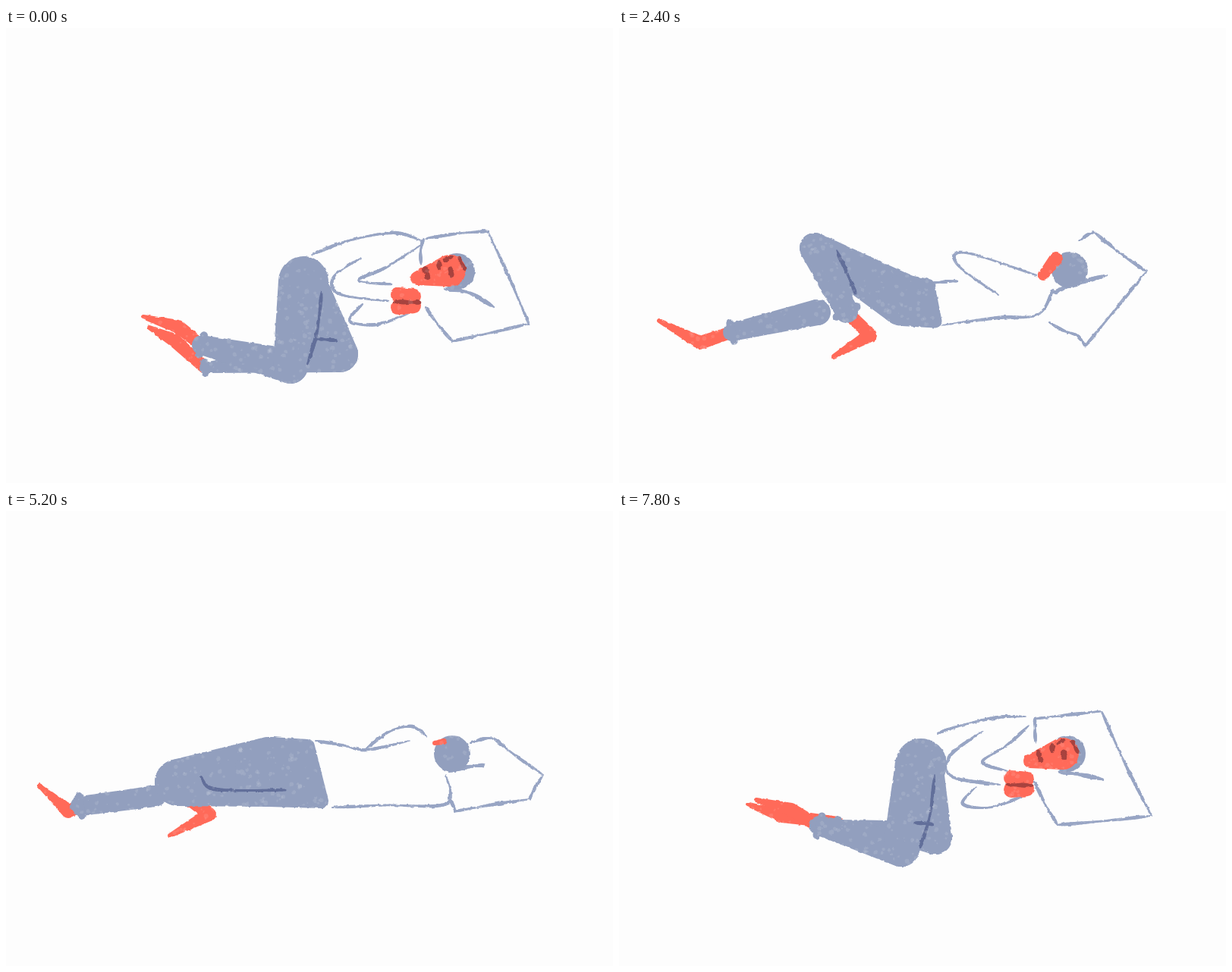
Recreate the animation shown at these times as an HTML page with a canvas. Size 800x600 px, loop 8 s.

```html
<!DOCTYPE html>
<html lang="en">
<head>
<meta charset="utf-8">
<title>Sleeper</title>
<style>
  html, body { margin: 0; width: 100%; height: 100%; overflow: hidden; background: #fdfdfd; }
  canvas { display: block; filter: url(#rough); }
  svg { position: absolute; width: 0; height: 0; }
</style>
</head>
<body>
<canvas id="stage" width="800" height="600"></canvas>
<svg><filter id="rough" x="0" y="0" width="1" height="1" color-interpolation-filters="sRGB">
  <feTurbulence id="noise" type="fractalNoise" baseFrequency=".15" numOctaves="2"/>
  <feDisplacementMap in="SourceGraphic" scale="3" xChannelSelector="R" yChannelSelector="G"/>
</filter></svg>
<script>
const ctx = document.getElementById('stage').getContext('2d');
const noise = document.getElementById('noise');
const STEP = 200, STEPS = 40;
const CLOTH = '#929fbe', LINE = '#98a5c4', DARK = '#626f9a', SKIN = '#ff6a59', SHADE = '#a8433f';

// Joints are [x, y] or [x, y, radius]; a pose lists only what differs from the one it extends.
const settled = {
  facing: 1,
  seat: [392, 334, 33], knee: [375, 446, 23], ankle: [258, 418, 13], heel: [227, 394], toe: [181, 381],
  farHip: [405, 350, 24], farKnee: [440, 430, 24], farAnkle: [262, 448, 7], farHeel: [222, 412], farToe: [189, 395],
  crease: [[416, 348], [410, 400], [397, 444]],
  back: [[403, 299], [450, 281], [510, 270], [547, 280]],
  arm: [[468, 303], [432, 328], [440, 351], [504, 360]],
  belly: [[470, 364], [453, 386], [488, 391], [530, 377]],
  fold: [[547, 286], [500, 316], [464, 333], [508, 338]],
  hands: [528, 360],
  pillow: [[547, 312], [550, 278], [635, 268], [689, 390], [588, 413], [553, 368]],
  strand: [[578, 344], [610, 349], [643, 368]],
  hair: [594, 321, 24], chin: [542, 330, 9], brow: [585, 320, 21]
};
const inhaling = {
  ...settled,
  seat: [398, 334, 34], knee: [372, 445, 24], ankle: [264, 415, 13],
  farKnee: [417, 431, 22], farAnkle: [288, 411, 4], farHeel: [215, 402], farToe: [170, 387],
  back: [[420, 293], [450, 283], [500, 272], [536, 271]],
  arm: [[480, 290], [437, 322], [438, 350], [502, 361]],
  fold: [[540, 283], [510, 310], [479, 331], [512, 343]],
  pillow: [[549, 306], [548, 274], [636, 264], [702, 402], [578, 414], [546, 354]],
  strand: [[580, 344], [610, 348], [638, 354]],
  hair: [591, 320, 24]
};
const stirring = {
  ...inhaling,
  seat: [394, 340, 34], knee: [378, 441, 22], ankle: [270, 435, 16], heel: [229, 397], toe: [187, 382],
  farKnee: [440, 424, 24], farAnkle: [262, 450, 6], farHeel: [222, 420], farToe: [190, 399],
  back: [[404, 297], [450, 281], [510, 270], [543, 277]],
  arm: [[491, 288], [441, 326], [441, 351], [510, 359]],
  strand: [[545, 343], [590, 346], [634, 350]]
};
const onBack = {
  ...settled, facing: 0,
  seat: [375, 359, 34], knee: [258, 290, 20], ankle: [300, 374, 15], heel: [331, 405], toe: [283, 433],
  farHip: [262, 375, 17], farKnee: [261, 375, 17], farAnkle: [149, 401, 12], farHeel: [107, 415], farToe: [53, 386],
  crease: [[287, 293], [300, 322], [312, 350]],
  back: [[414, 336], [425, 335], [435, 334], [446, 334]],
  arm: [[500, 352], [446, 312], [456, 296], [550, 326]],
  belly: [[425, 392], [500, 382], [552, 378], [572, 345]],
  pillow: [[606, 281], [626, 269], [695, 321], [615, 419], [604, 405], [567, 388]],
  strand: [[572, 349], [600, 338], [643, 326]],
  hair: [594, 319, 24], chin: [559, 326, 7], brow: [576, 304, 9]
};
const kneesUp = {
  ...onBack,
  knee: [302, 254, 20], ankle: [280, 376, 15], heel: [292, 410], toe: [244, 437],
  farHip: [330, 330, 25], farKnee: [280, 310, 18], farAnkle: [208, 402, 12], farHeel: [172, 418], farToe: [124, 404],
  crease: [[318, 262], [322, 300], [326, 343]]
};
const away = {
  ...onBack,
  seat: [348, 344, 46], knee: [227, 358, 31], ankle: [238, 378, 10], heel: [268, 400], toe: [216, 428],
  farHip: [197, 376, 14], farKnee: [196, 376, 14], farAnkle: [98, 389, 13], farHeel: [82, 396], farToe: [44, 362],
  crease: [[257, 350], [276, 367], [367, 368]],
  back: [[408, 303], [445, 309], [475, 315], [532, 303]],
  arm: [[475, 313], [505, 291], [535, 284], [555, 298]],
  belly: [[430, 391], [500, 388], [580, 386], [580, 348]],
  pillow: [[612, 306], [642, 299], [708, 348], [690, 380], [592, 396], [583, 378]],
  strand: [[584, 344], [605, 338], [630, 335]],
  hair: [588, 320, 24], chin: [565, 306, 3], brow: [577, 304, 4]
};
const awayInhaling = {
  ...away,
  ankle: [228, 384, 10], farAnkle: [112, 389, 11], farHeel: [91, 398], farToe: [57, 372],
  arm: [[488, 307], [515, 287], [548, 282], [572, 320]],
  pillow: [[610, 306], [638, 297], [718, 358], [680, 386], [602, 400], [586, 386]],
  hair: [593, 324, 23], chin: [571, 306, 3], brow: [584, 304, 4]
};

const timeline = [[0, settled], [4, inhaling], [8, stirring], [10, kneesUp], [12, onBack], [16, away], [18, away],
  [20, awayInhaling], [22, awayInhaling], [24, away], [26, away], [30, onBack], [32, kneesUp], [35, settled],
  [39, inhaling], [40, inhaling]];

function mix(a, b, k) {
  if (typeof a === 'number') return a + (b - a) * k;
  if (Array.isArray(a)) return a.map((v, i) => mix(v, b[i], k));
  return Object.fromEntries(Object.keys(a).map(name => [name, mix(a[name], b[name], k)]));
}

function poseAt(step) {
  const i = timeline.findIndex((key, n) => step < timeline[n + 1][0]);
  const [t0, from] = timeline[i], [t1, to] = timeline[i + 1];
  const k = (step - t0) / (t1 - t0);
  return mix(from, to, k * k * (3 - 2 * k));
}

let seed = 1;
const random = () => (seed = (seed * 16807) % 2147483647) / 2147483647;
const shift = ([x, y], dx, dy, r) => [x + dx, y + dy, r];
const round = ([x, y], r) => [x, y, r];

// Fills a chain of circles joined by their outer tangents.
function blob(color, ...circles) {
  ctx.fillStyle = color;
  ctx.beginPath();
  circles.slice(1).forEach(([bx, by, br], i) => {
    const [ax, ay, ar] = circles[i];
    const angle = Math.atan2(by - ay, bx - ax);
    const ratio = (ar - br) / (Math.hypot(bx - ax, by - ay) || 1);
    const open = Math.acos(Math.max(-1, Math.min(1, ratio)));
    ctx.moveTo(ax + ar * Math.cos(angle + open), ay + ar * Math.sin(angle + open));
    ctx.arc(ax, ay, ar, angle + open, angle - open + 2 * Math.PI);
    ctx.arc(bx, by, br, angle - open, angle + open);
    ctx.closePath();
  });
  ctx.fill();
}

function spline(points, t) {
  const i = Math.min(points.length - 2, Math.floor(t)), u = t - i;
  const at = n => points[Math.max(0, Math.min(points.length - 1, n))];
  return [0, 1].map(c => {
    const [p, a, b, q] = [at(i - 1)[c], at(i)[c], at(i + 1)[c], at(i + 2)[c]];
    return a + u * ((b - p) / 2 + u * (p - 2.5 * a + 2 * b - q / 2 + u * (1.5 * (a - b) + (q - p) / 2)));
  });
}

// A dry brush stroke: pressure swells along the way and fades at both ends.
function brush(color, width, points) {
  const count = 14 * (points.length - 1), phase = random() * 6;
  ctx.strokeStyle = color;
  for (let i = 0; i < count; i++) {
    const t = i / count, ends = Math.min(1, 0.5 + 4 * Math.min(t, 1 - t));
    ctx.lineWidth = width * ends * (0.8 + 0.2 * Math.sin(phase + t * 11));
    ctx.beginPath();
    ctx.moveTo(...spline(points, i * (points.length - 1) / count));
    ctx.lineTo(...spline(points, (i + 1) * (points.length - 1) / count));
    ctx.stroke();
  }
}

function drawPillow({ pillow }) {
  pillow.slice(1).forEach((b, i) => {
    const middle = mix(pillow[i], b, 0.5);
    brush(LINE, 4.5, [pillow[i], shift(middle, random() * 4 - 2, random() * 4 - 2), b]);
  });
}

function drawLeg(knee, ankle) {
  const angle = Math.atan2(ankle[1] - knee[1], ankle[0] - knee[0]) + Math.PI / 2;
  const dx = Math.cos(angle) * ankle[2], dy = Math.sin(angle) * ankle[2];
  blob(CLOTH, knee, ankle);
  blob(CLOTH, shift(ankle, dx, dy, 5), shift(ankle, -dx, -dy, 5));
}

function drawLegs(p, facing) {
  blob(SKIN, round(p.farAnkle, 8), round(p.farHeel, 9), round(p.farToe, 3));
  blob(SKIN, round(p.ankle, 8), round(p.heel, 9), round(p.toe, 3));
  blob(CLOTH, p.farHip, p.farKnee);
  drawLeg(p.farKnee, p.farAnkle);
  drawLeg(p.knee, p.ankle);
  blob(CLOTH, p.seat, p.knee);
  if (facing) {
    const tuck = shift(p.farKnee, -28, -20);
    brush(DARK, 5, [tuck, shift(tuck, 24, 2)]);
  } else {
    const waist = [p.back[0], p.belly[0]].map(joint => round(mix(joint, p.seat.slice(0, 2), 0.17), 9));
    blob(CLOTH, p.seat, ...waist, p.seat);
  }
  brush(DARK, 5, p.crease);
}

function drawHead({ hair, chin, brow, strand }, facing) {
  brush(LINE, 6, strand);
  blob(CLOTH, hair, hair);
  blob(SKIN, chin, brow);
  if (!facing) return;
  const mark = (width, ...offsets) => brush(SHADE, width, offsets.map(([x, y]) => shift(brow, x, y)));
  mark(7, [-33, -4], [-29, 9]);
  mark(7, [-14, -12], [-14, -3]);
  mark(7, [1, -3], [2, 6]);
  mark(5, [-8, -13], [2, -18]);
  mark(5, [12, -17], [20, -1]);
}

function drawHands({ hands }) {
  for (const dy of [-8, 8]) blob(SKIN, shift(hands, -11, dy, 10), shift(hands, 9, dy * 0.8, 10));
  brush(SHADE, 6, [shift(hands, -17, 1), shift(hands, 17, 2)]);
}

function drawGrain() {
  ctx.globalCompositeOperation = 'source-atop';
  ctx.fillStyle = 'rgba(255,255,255,.1)';
  for (let i = 0; i < 1800; i++) {
    ctx.beginPath();
    ctx.arc(random() * 800, 210 + random() * 270, 0.5 + random() * 2.5, 0, 7);
    ctx.fill();
  }
  ctx.globalCompositeOperation = 'source-over';
}

function draw(step) {
  const pose = poseAt(step), facing = pose.facing > 0.5;
  seed = step * 7919 + 17;
  noise.setAttribute('seed', step + 1);
  ctx.clearRect(0, 0, 800, 600);
  ctx.lineCap = 'round';
  drawPillow(pose);
  for (const name of ['back', 'arm', 'belly']) brush(LINE, 4.5, pose[name]);
  if (facing) brush(LINE, 4.5, pose.fold);
  drawLegs(pose, facing);
  if (facing) drawHands(pose);
  drawHead(pose, facing);
  drawGrain();
}

let shown = -1;
function tick() {
  const step = Math.floor(performance.now() / STEP) % STEPS;
  if (step !== shown) draw(shown = step);
  requestAnimationFrame(tick);
}
tick();
</script>
</body>
</html>
```
